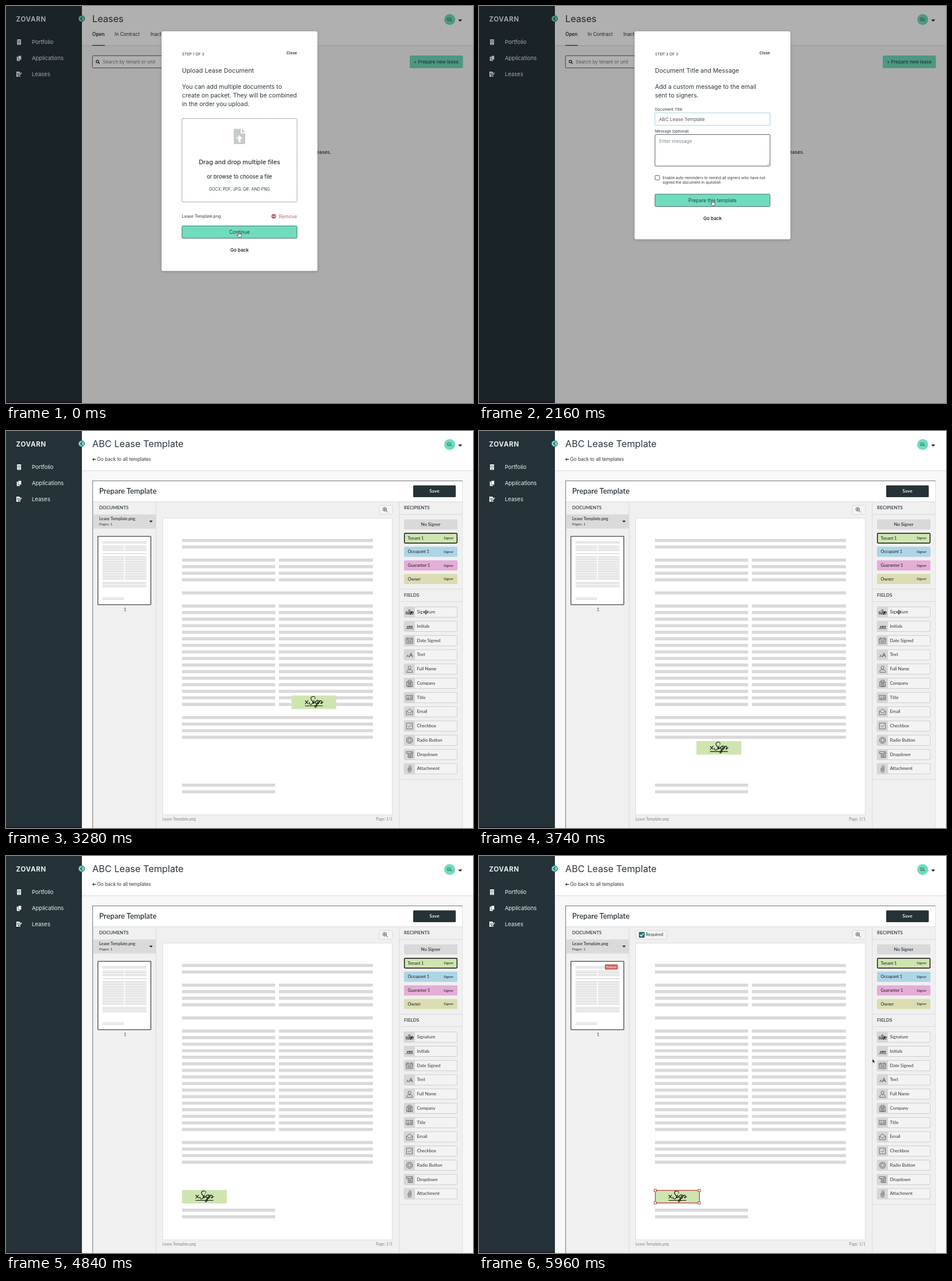
An HTML page that plays this animation: 812 by 690 pixels, repeating every 6 s.

```html
<!DOCTYPE html>
<html lang="en">
<head>
<meta charset="utf-8">
<title>Lease template</title>
<style>
html, body { margin: 0; width: 100%; height: 100%; overflow: hidden; background: #fff; }
svg { display: block; width: 100%; height: 100%; }
.ui { font-family: Inter, "Open Sans", sans-serif; }
.editor { font-family: Lato, "Open Sans", sans-serif; }
.modal { filter: drop-shadow(0 1px 2px rgba(0, 0, 0, .25)); }
</style>
</head>
<body>
<svg id="stage" class="ui" viewBox="0 0 812 690"></svg>
<script>
const INK = '#2c373d', TEAL = '#6fdcbe', NAVY = '#253238', GREEN = '#cfe5b0', RED = '#c0473f';

const text = (x, y, s, size, weight = 400, fill = INK, anchor = 'start') =>
  `<text x="${x}" y="${y}" font-size="${size}" font-weight="${weight}" fill="${fill}" text-anchor="${anchor}">${s}</text>`;
const lines = (x, y, step, rows, ...rest) =>
  rows.map((s, i) => text(x, y + i * step, s, ...rest)).join('');
const rect = (x, y, w, h, fill, more = '') =>
  `<rect x="${x}" y="${y}" width="${w}" height="${h}" fill="${fill}" ${more}/>`;
const box = (x, y, w, h, fill, stroke, r = 1.5, sw = .8) =>
  rect(x, y, w, h, fill, `stroke="${stroke}" stroke-width="${sw}" rx="${r}"`);
const path = (d, fill, stroke = 'none', sw = 1) =>
  `<path d="${d}" fill="${fill}" stroke="${stroke}" stroke-width="${sw}" stroke-linecap="round" stroke-linejoin="round"/>`;
const dot = (x, y, r, fill, stroke = 'none', sw = 1) =>
  `<circle cx="${x}" cy="${y}" r="${r}" fill="${fill}" stroke="${stroke}" stroke-width="${sw}"/>`;
const at = (x, y, s, k = 1) => `<g transform="translate(${x} ${y}) scale(${k})">${s}</g>`;

// Parts shared by every screen
const sidebar = rect(0, 0, 132, 690, NAVY) + rect(0, 688, 132, 2, '#241c30') +
  `<g letter-spacing=".7">${text(17.5, 26.5, 'ZOVARN', 11.5, 700, '#eceff0')}</g>` +
  rect(19.3, 58, 6.8, 9.4, '#fff', 'rx=".6"') +
  path('M21 60.5h1M23.6 60.5h1M21 62.8h1M23.6 62.8h1M22.7 66.5v-1.6', 'none', NAVY, 1) +
  rect(18.8, 88, 5.6, 7.4, '#fff', 'rx=".6"') +
  box(21.2, 86.2, 5.6, 7.4, '#fff', NAVY, .6, .7) +
  path('M18 114h5l2 2v7h-7z', '#fff') + path('M19.3 117h3.4M19.3 119h2.6', 'none', NAVY, .8) +
  path('M22.6 121l4.2-4.4', 'none', NAVY, 3) + path('M22.8 120.8l4-4.2', 'none', '#fff', 1.5) +
  ['Portfolio', 'Applications', 'Leases'].map((s, i) =>
    text(45, 65.8 + i * 28, s, 9.5, 400, '#eef1f2')).join('') +
  dot(131.2, 22, 5.4, TEAL, NAVY, .8) + path('M132.4 19.4l-2.6 2.6 2.6 2.6', 'none', NAVY, 1.2);

const header = title => rect(0, 0, 812, 690, '#f8f8f8') + rect(132, 0, 680, 69, '#fff') +
  rect(132, 68.5, 680, 1, '#d9d9d9') + text(150, 28.3, title, 16.2) +
  dot(771.5, 23.5, 9.5, TEAL) + text(771.5, 26.2, 'GL', 7.2, 400, INK, 'middle') +
  path('M787 23.8h5.6l-2.8 3z', '#111', '#111', .5) + sidebar;

const leases = header('Leases') +
  text(150, 52.4, 'Open', 8.3, 600) + text(189, 52.4, 'In Contract', 8.3) +
  text(251, 52.4, 'Inactive', 8.3) + rect(150, 67.8, 22, 1.2, INK) +
  box(150.3, 86.4, 170, 21.2, '#fff', INK) +
  dot(159, 96.5, 2.2, 'none', '#111', 1.1) + path('M160.8 98.4l1.6 1.7', 'none', '#111', 1.3) +
  text(168, 100, 'Search by tenant or unit', 8.15, 400, '#757c80') +
  rect(702, 86, 92.5, 22, TEAL, 'rx="1.5"') +
  text(748, 100.2, '+ Prepare new lease', 8.05, 400, INK, 'middle') +
  text(565.5, 256.5, 'You do not have any open leases.', 8.3, 500, INK, 'end');

// Modal steps
const hand = (x, y) => at(x, y, path(
  'M-1.6 1.2V-4Q-.7-5.4.2-4V-1.2L3.2-.5Q4-.2 3.9.8L3.2 4.6H-1.4L-3.8 1.4Q-3.6.2-2.6.6z', '#fff', '#222', .7));
const button = (y, s) => box(306, y, 200, 21.5, TEAL, '#34504d') +
  text(406, y + 14, s, 8.35, 400, INK, 'middle') +
  text(406, y + 45.2, 'Go back', 8.1, 500, '#111', 'middle');
const modal = (step, bottom, body) => leases + rect(0, 0, 812, 690, '#000', 'opacity=".31"') +
  `<g class="modal">${rect(270.5, 44, 271, bottom - 44, '#fff', 'rx="3"')}</g>` +
  text(306, 86.2, `STEP ${step} OF 3`, 6.75) + text(506, 84.4, 'Close', 6.7, 500, '#111', 'end') + body;

const upload = modal(1, 460.6,
  text(306, 115.8, 'Upload Lease Document', 10.75) +
  lines(306, 143.8, 14.9, ['You can add multiple documents to', 'create on packet. They will be combined', 'in the order you upload.'], 10.45) +
  rect(306, 195.6, 200, 145, '#fff', 'stroke="#4a5459" stroke-width=".8" stroke-dasharray="1.8 1.1" rx="2"') +
  path('M397 213.5h11v8h8v17q0 1.5-1.5 1.5h-17q-1.5 0-1.5-1.5v-23.5q0-1.5 1-1.5zM410 213.5l6 6h-6z', '#c6caca') +
  path('M406 225l5.2 5.6h-3.6v6h-3.2v-6h-3.6z', '#fff', '#fff', .6) +
  text(406, 274.8, 'Drag and drop multiple files', 10.75, 500, INK, 'middle') +
  text(406, 300.4, 'or browse to choose a file', 9.2, 500, INK, 'middle') +
  text(406, 321, 'DOCX, PDF, JPG, GIF, AND PNG', 6.95, 400, INK, 'middle') +
  text(306, 368.4, 'Lease Template.png', 7.05) +
  dot(465.5, 365.5, 4, '#bf626b') + path('M463.6 365.5h3.8', 'none', '#fff', 1.2) +
  text(506, 368.9, 'Remove', 8.3, 400, '#bf626b', 'end') +
  button(382.2, 'Continue') + hand(405.5, 397.3));

const role = (name, y, stroke, owner) => text(306, y + 16.4, name, 9.25) +
  box(409.4, y, 93.3, 21.4, owner ? '#eceeee' : '#fff', stroke) +
  text(owner ? 415.5 : 418, y + 13.7, '1', 8, 400, '#596165') +
  (owner ? '' : path(`M495.6 ${y + 9.6}l2.2 2.2 2.2-2.2`, 'none', '#111', 1.2));
const roles = modal(2, 431.6,
  lines(306, 115.8, 14.9, ['Choose the number of roles this', 'document\'s signers can represent.'], 10.45, 500) +
  lines(306, 158.7, 14.9, ['We recommend you choose the', 'maximum number of signers each role', 'can potentially represent on this lease', 'document template.'], 10.45) +
  role('Tenants', 223.1, INK) + role('Guarantors', 253.9, '#4a3843') +
  rect(408.3, 283.5, 95.5, 23.8, '#d5f3ea', 'rx="2.5"') + role('Occupants', 284.7, '#8fdcc6') +
  role('Owner (you)', 315.5, INK, true) +
  button(353, 'Continue') + hand(405.5, 369));

const message = modal(3, 405.5,
  text(306, 115.8, 'Document Title and Message', 10.6) +
  lines(306, 143.8, 14.9, ['Add a custom message to the email', 'sent to signers.'], 10.45) +
  text(306, 181.8, 'Document Title', 6.65) +
  rect(305, 184.8, 202, 23.6, '#d8eef3', 'rx="2"') + box(306, 185.8, 200, 21.5, '#fff', '#a8d3de') +
  text(313, 199.6, 'ABC Lease Template', 8.1, 400, '#4d555a') +
  text(306, 219.8, 'Message (optional)', 6.5) +
  box(306, 223.4, 200, 54.8, '#fff', INK) + path('M501 277l4-4M503.4 277l1.6-1.6', 'none', '#777', .6) +
  text(313, 238.3, 'Enter message', 8.2, 400, '#80878b') +
  box(306.2, 294.6, 7.6, 7.6, '#fff', INK, 1) +
  lines(319.3, 300.7, 8.7, ['Enable auto-reminders to remind all signers who have not', 'signed the document in question'], 6.57) +
  button(327, 'Prepare this template') + hand(406.5, 342.5));

// Document page: placeholder rows on a regular grid
const FULL = [[306, 332]], LEFT = [[306, 162]], PAIR = [...LEFT, [474.5, 163.5]];
function page(height, fill) {
  const row = (y, cols) => cols.map(([x, w]) => rect(x, y - height / 2, w, height, fill)).join('');
  const rows = (from, to, cols) => {
    let s = '';
    for (let k = from; k <= to; k++) s += row(190.2 + k * 11.4, cols);
    return s;
  };
  return rows(0, 1, FULL) + rows(3, 6, PAIR) + rows(8, 8, FULL) + rows(10, 25, PAIR) +
    rows(27, 30, FULL) + row(615.5, LEFT) + row(627, LEFT);
}

const scribble = sw => path('M24 9l5 5M29 8.5l-5 6M41 3C39 0 33 2 34 6S39 9 37 13 31 16 31 12' +
  'M39.4 8.5L37.8 13Q38 15 41 11M40.8 5.5l.4-.8M46 8.5C43 7 40 14 43 14S46 9 46.5 8.5L44 18C42 23 39 20 42 17L48 13' +
  'M48.5 8.5L47 14.5Q50 8 52 9T51 13.5Q52 15 55 11M24 18H54', 'none', '#111', sw);

const recipient = ([name, fill], i) => {
  const y = 177.4 + i * 23.7;
  return (i ? rect(692, y, 93, 17.6, fill, 'rx="1.5"') : box(692.7, y + .4, 91.6, 17, fill, '#111', 1.5, 1.4)) +
    text(698.5, y + 11.2, name, 7.3, 600) + text(778, y + 10.8, 'Signer', 6.1, 600, INK, 'end');
};

// Icons are drawn around their own centre
const icon = d => path(d, 'none', '#3a4145', .7);
const fields = [
  ['Signature', at(-17, -4.8, scribble(2), .44)],
  ['Initials', '<g font-style="italic">' + text(.6, 2, 'xInt', 6.3, 700, '#111', 'middle') + '</g>' + path('M-6 3.8h12', 'none', '#111', .7)],
  ['Date Signed', icon('M-5.5-4h11v9h-11zM-5.5-1.5h11M-3-5.2v2M3-5.2v2M-3.5.8h7M-3.5 2.8h7')],
  ['Text', text(-5.5, 3.6, 'A', 6.5) + text(-1, 3.6, 'A', 10)],
  ['Full Name', icon('M-2.5-2.5a2.5 2.8 0 1 1 5 0a2.5 2.8 0 1 1-5 0M-5 5.2q0-4 3-4h4q3 0 3 4z')],
  ['Company', icon('M-2.5 5.3v-10.6h5v10.6zM-5 5.3v-8h2.5M5 5.3v-8h-2.5M-5 5.3h10M-.8-3v6.5M.9-3v6.5')],
  ['Title', icon('M-5.5-3.8h11v7.6h-11zM-3.7 2q0-2 1.4-2t1.4 2zM-2.9-1.5h1.2M1-1.5h3M1 .2h3M1 2h3')],
  ['Email', icon('M-5.2-1L0-5 5.2-1V5h-10.4zM-5.2-1L0 2.4 5.2-1')],
  ['Checkbox', icon('M-5-5h10v10h-10zM-2.6 0l2 2 3.6-4')],
  ['Radio Button', dot(0, 0, 5.3, 'none', '#3a4145', .8) + dot(0, 0, 3, 'none', '#3a4145', .8)],
  ['Dropdown', icon('M-5.2-5h10.4v3.2h-10.4zM-2.4-1.8v7h7.6v-7M-.8.3h4M-.8 2h4M-.8 3.7h4M2.4-3.8l.9.9.9-.9')],
  ['Attachment', icon('M1-2.5v5a1 1 0 0 1-2 0v-6a1.8 1.8 0 0 1 3.6 0v7a2.6 2.6 0 0 1-5.2 0v-4.5')]
];
const field = ([name, art], i) => {
  const y = 314.8 + i * 24.75;
  return box(692.3, y - 9, 92.2, 18, '#f3f3f3', '#c4c4c4') + rect(692, y - 9.3, 19, 18.6, '#d6d6d6') +
    at(701.7, y, art) + text(714.5, y + 2.3, name, 7.7);
};
const rule = (x, y, w) => rect(x, y, w, 1, '#dadada');

const editor = header('ABC Lease Template') +
  path('M150.8 49.4h5.4M152.6 47.7l-1.9 1.7 1.9 1.7', 'none', INK, 1.1) +
  text(158.5, 52.4, 'Go back to all templates', 8.25) +
  '<g class="editor">' +
  rect(150, 86, 644, 604, '#f0f0f0') + rect(151, 87, 643, 36, '#fff') + rule(151, 122.5, 643) +
  rect(150, 86, 644, 1.2, '#868686') + rect(150, 86, 1.2, 604, '#868686') + rect(793.3, 87, .8, 603, '#dcdcdc') +
  text(162, 108.6, 'Prepare Template', 13, 600) +
  rect(708, 94.5, 74, 20.5, NAVY, 'rx="1.5"') + text(745, 107.4, 'Save', 8.4, 600, '#fff', 'middle') +
  rect(260.5, 123, 1, 567, '#dadada') + rect(683.3, 123, 1, 567, '#dadada') +
  text(162, 136.4, 'DOCUMENTS', 8, 600) + rect(151.2, 145, 109.5, 24.5, '#dadada') +
  text(162, 154.8, 'Lease Template.png', 7.3, 600) + text(162, 164, 'Pages: 1', 6.4) +
  path('M249.8 156h4.8l-2.4 2.6z', '#111', '#111', .4) +
  box(159.8, 183.2, 92, 118.6, '#fff', '#3f474b', .5, 1.3) +
  at(97.2, 148.2, page(3.4, '#b8b8b8'), .2306) + text(207, 313.4, '1', 7.5, 400, INK, 'middle') +
  box(649, 129.3, 23, 15.5, '#f4f4f4', '#d5d5d5') +
  dot(658.5, 136, 3.2, 'none', '#333', .8) + path('M661 138.6l2.8 2.6M657 136h3M658.5 134.5v3', 'none', '#333', .8) +
  box(272.5, 151.3, 399, 515.7, '#fff', '#d8d8d8', 0) + page(5.4, '#d9d9d9') +
  text(272, 677.4, 'Lease Template.png', 6.8, 400, '#7d8285') + text(672, 677.4, 'Page: 1/1', 6.8, 400, '#7d8285', 'end') +
  text(692, 136.4, 'RECIPIENTS', 8.1, 600) + rule(684, 144.5, 110) +
  rect(692, 153.5, 93, 17.6, '#d9d9d9', 'rx="1.5"') + text(738.5, 164.9, 'No Signer', 7.8, 600, INK, 'middle') +
  [['Tenant 1', GREEN], ['Occupant 1', '#aed5e5'], ['Guarantor 1', '#e5add7'], ['Owner', '#dcdcb2']].map(recipient).join('') +
  rule(684, 274.5, 110) + text(692, 288.4, 'FIELDS', 8.1, 600) + rule(684, 296, 110) +
  fields.map(field).join('') + rule(684, 605, 110) +
  `<g id="tag">${rect(0, 0, 78, 23.5, GREEN, 'rx="1"')}${scribble(1.15)}</g>` +
  '<g id="move">' + path('M726.5 315h7M730 311.5v7', 'none', '#fff', 2.6) +
  path('M726.5 315h7M730 311.5v7M727.6 314l-1.2 1 1.2 1M732.4 314l1.2 1-1.2 1M729 312.6l1-1.2 1 1.2M729 317.4l1 1.2 1-1.2', 'none', '#111', .9) + '</g>' +
  '<g id="picked">' +
  rect(306.5, 581.2, 76.8, 21.8, 'none', `stroke="${RED}" stroke-width="1.3"`) +
  [306.5, 383].map(x => [581.3, 602.8].map(y => box(x - 2, y - 2, 4, 4, '#fff', RED, 0, 1.1)).join('')).join('') +
  rect(219, 188.3, 22.2, 9.2, '#c4645a') + text(230, 195.1, 'Edited', 6.3, 400, '#fff', 'middle') +
  box(272.5, 129.3, 54, 15.5, '#f4f4f4', '#d5d5d5') + rect(278, 132, 10, 10, '#1f7076', 'rx="1"') +
  path('M280.2 137l2 2.2 3.8-4.4', 'none', '#fff', 1.3) + text(290, 139.4, 'Required', 7.7) +
  path('M684.2 352.6v7l1.5-1.3 1 2.3 1-.4-1-2.3h2z', '#111', '#fff', .4) + '</g></g>';

const scene = (id, s) => `<g id="${id}">${s}</g>`;
document.getElementById('stage').innerHTML =
  scene('upload', upload) + scene('roles', roles) + scene('message', message) + scene('editor', editor);
const $ = id => document.getElementById(id);

// Drag keys: time, x, y, velocity x, velocity y (px per ms)
const drag = [
  [2680, 653, 315.5, 0, 0],
  [3290, 495.3, 460.5, -.1, .07],
  [3930, 340, 563, -.1, .055],
  [4320, 315, 576, -.045, .022],
  [4540, 308, 579.7, -.025, .01],
  [4620, 306, 580.5, 0, 0]
];
function tagPlace(t) {
  t = Math.min(Math.max(t, drag[0][0]), drag.at(-1)[0]);
  const i = Math.max(1, drag.findIndex(k => k[0] >= t));
  const a = drag[i - 1], b = drag[i], d = b[0] - a[0], u = (t - a[0]) / d;
  const hermite = n => a[n] * (1 + 2 * u) * (1 - u) ** 2 + b[n] * u * u * (3 - 2 * u) +
    d * (a[n + 2] * u * (1 - u) ** 2 - b[n + 2] * u * u * (1 - u));
  return [hermite(1), hermite(2)];
}

const ramp = (t, from, to) => Math.min(1, Math.max(0, (t - from) / (to - from)));
function fade(id, amount) {
  $(id).setAttribute('opacity', amount);
  $(id).style.display = amount ? '' : 'none';
}
function draw(t) {
  fade('roles', ramp(t, 20, 840));
  fade('message', ramp(t, 1460, 2060));
  fade('editor', ramp(t, 2170, 2680));
  fade('move', 1 - ramp(t, 4580, 4820));
  fade('picked', ramp(t, 4960, 5940));
  $('tag').setAttribute('transform', `translate(${tagPlace(t)})`);
}

const start = performance.now();
function tick() {
  draw((performance.now() - start) % 6000);
  requestAnimationFrame(tick);
}
tick();
</script>
</body>
</html>
```
